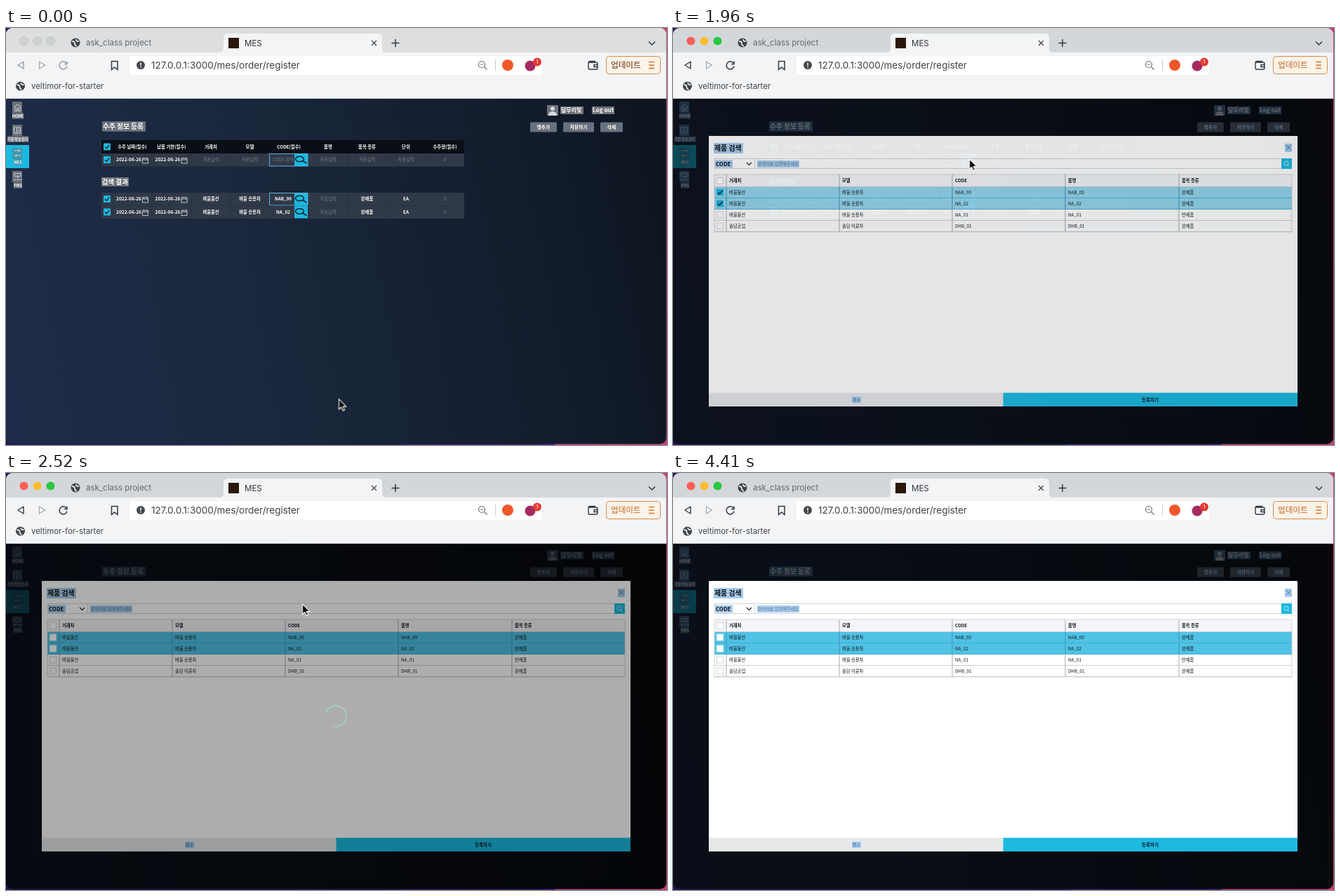
An HTML page for the animation above (5180 ms loop, 942 by 595 pixels).

```html
<!DOCTYPE html>
<html>
<head>
<meta charset="utf-8">
<title>MES</title>
<style>
  html, body { margin: 0; width: 100%; height: 100%; overflow: hidden; background: #22164f; }
  svg { display: block; width: 942px; height: 595px; }
  text { font-family: "Noto Sans CJK KR", "Noto Sans CJK", sans-serif; white-space: pre; }
  text.ui { font-family: Inter, Roboto, sans-serif; }
</style>
</head>
<body>
<svg id="stage" viewBox="0 0 942 595" xmlns="http://www.w3.org/2000/svg"></svg>
<script>
const LOOP = 5180;
const CYAN = '#1cb9e0';

// Drawing helpers: each returns SVG markup; text is placed by its visual centre line.
const rect = (x, y, w, h, fill, more = '') =>
  `<rect x="${x}" y="${y}" width="${w}" height="${h}" fill="${fill}" ${more}/>`;
const circle = (x, y, r, fill, more = '') =>
  `<circle cx="${x}" cy="${y}" r="${r}" fill="${fill}" ${more}/>`;
const line = (d, stroke, width = 1, more = '') =>
  `<path d="${d}" fill="none" stroke="${stroke}" stroke-width="${width}" ${more}/>`;
const text = (x, y, s, size, fill, weight = 400, anchor = 'start', cls = '') =>
  `<text x="${x}" y="${y + size * .365}" font-size="${size}" fill="${fill}" font-weight="${weight}" text-anchor="${anchor}" class="${cls}">${s}</text>`;
const mid = (x, y, s, size, fill, weight = 700) => text(x, y, s, size, fill, weight, 'middle');
const group = (id, body, more = '') => `<g id="${id}" ${more}>${body}</g>`;

// Selected-text box: blue while the window has focus, grey before.
const mark = (x, y, w, h) =>
  rect(x, y, w, h, '#4f79a9') + rect(x, y, w, h, '#6d7279', 'class="idle"');
const lightMark = (x, y, w, h) => rect(x, y, w, h, '#a6cdf0');

const globe = (x, y) => circle(x, y, 6.5, '#3f4347') +
  line(`M${x - 5} ${y - 2}q4 0 4 3t3 4M${x + 1} ${y - 5}q-1 3 4 3`, '#e4e6e8', 1.8);

function chrome() {
  const lights = ['#ff5f57', '#febc2e', '#28c840'].map((c, i) =>
    circle(25.5 + i * 19, 18.5, 6, c) +
    circle(25.5 + i * 19, 18.5, 6, '#cfd0d2', 'class="idle" stroke="#bfc1c3" stroke-width=".6"')).join('');
  const nav = (color, cls = '') =>
    line('M25 48L17 53L25 58Z', color, 1.4, `class="${cls}" stroke-linejoin="round"`) +
    line('M86 50A5.5 5.5 0 1 0 87 54.500M87 47.500V51.500H83', color, 1.5, `class="${cls}"`);
  return rect(0, 0, 942, 36, '#d4d7da') + rect(0, 0, 942, 36, '#dcdee0', 'class="idle"') +
    rect(0, 35, 942, 66, '#f3f4f5') + lights +
    globe(99, 21) + text(114, 21, 'ask_class project', 11.5, '#65696d', 400, 'start', 'ui') +
    `<path d="M304 35q6 0 6-6v-15q0-6 6-6h214q6 0 6 6v15q0 6 6 6z" fill="#f3f4f5"/>` +
    rect(317, 14, 15, 15, '#2b1708') +
    text(340, 21.500, 'MES', 11.5, '#33373b', 400, 'start', 'ui') +
    line('M521 18l7 7m0-7l-7 7', '#44484c', 1.3) + line('M555 16v11m-5.500-5.500h11', '#34383c', 1.5) +
    line('M916 19.500l4.500 4.500l4.500-4.500', '#34383c', 1.5) +
    nav('#34383c') + rect(14, 44, 78, 18, '#f3f4f5', 'class="idle"') + nav('#999da1', 'idle') +
    line('M47.500 48L55.500 53L47.500 58Z', '#a4a8ab', 1.2) +
    line('M150.500 47.500h8.500v12l-4.250-3.500l-4.250 3.500z', '#34383c', 1.5) +
    rect(176, 40, 588, 27, '#fff', 'rx="4"') +
    circle(192, 53, 6, '#44484c') + line('M192 49.500v4.200m0 1.300v1.500', '#fff', 1.5) +
    text(207, 53, '127.0.0.1:3000/mes/order/register', 13.45, '#3d4145', 400, 'start', 'ui') +
    circle(678, 52, 4.500, 'none', 'stroke="#6a6e72" stroke-width="1.2"') +
    line('M681.500 55.500l4 4M676 52h4', '#6a6e72', 1.2) +
    line('M697.500 45v16', '#c9cccf') +
    circle(715, 53, 8, '#f2572b') + circle(747, 54, 7.500, '#a52b62') +
    circle(757, 48.500, 6, '#e5392f') + text(757, 48.500, '1', 8, '#fff', 400, 'middle', 'ui') +
    line('M830.500 49h10.500q2 0 2 2v6q0 2-2 2h-9q-2 0-2-2v-8q0-1 2-1.500h8M843 52.500h-5v3h5', '#34383c', 1.4) +
    rect(855.500, 40.500, 77, 25, '#fcf3e9', 'rx="4" stroke="#dc8a45"') +
    text(862, 53, '업데이트', 11.600, '#c5651f') +
    `<g class="idle">${text(862, 53, '업데이트', 11.600, '#7c5a45')}</g>` +
    line('M916 48.500h8M916 53h8M916 57.500h8', '#d9772a', 1.3) +
    globe(20.500, 83) + text(36, 83, 'veltimor-for-starter', 11.4, '#42464a', 400, 'start', 'ui') +
    line('M0 100.500h942', '#c5c8cc');
}

function sidebar() {
  const icons = [
    'M11.500 113l5-4l5 4M13 112.500v6h2.500v-4h2v4h2.500v-6',
    'M11.500 142h4v8h-4zM15.500 142h5v8h-5M18 145v3',
    'M11.500 175h10m-3-2v4M11.500 182h10m-7-2v4',
    'M12 207.500h9v4h-9zM11 216.500h3m1.500 0h3m1.500 0h3M16.500 211.500v3'
  ];
  const labels = [['HOME', 16], ['기준정보관리', 30], ['MES', 11], ['PMS', 12]];
  return rect(0, 167, 33, 33, CYAN) + icons.map((d, i) => {
    const y = 105 + i * 33, [s, w] = labels[i], top = i === 2;
    return `<g opacity="${top ? .5 : 1}">${mark(9, y, 14, 16) + mark(17 - w / 2, y + 16.500, w, 8)}</g>` +
      line(d, '#c9d6e4', .9) + mid(17, y + 20.500, s, 5.500, '#fff');
  }).join('');
}

const checkbox = (x, y) => rect(x, y, 10, 10, CYAN, 'rx="1"') +
  line(`M${x + 2} ${y + 5}l2.300 2.500l4-5`, '#122438', 1.4);
const calendar = (x, y) => line(`M${x} ${y - 3}h8v7h-8zM${x} ${y - 1}h8M${x + 2} ${y - 4.500}v2m4-2v2`, '#dfe4ea', .8);
const edges = [152, 208, 264, 320, 375, 431, 487, 542, 598, 653];
const centre = i => (edges[i] + edges[i + 1]) / 2;

// Dimmed values are placeholders, marked with a leading dot.
function orderRow(y, cells, focused) {
  const cy = y + 9;
  let out = rect(136, y, 517, 18.500, '#303947') + checkbox(139, cy - 5) +
    edges.slice(0, -1).map(x => line(`M${x} ${y}v18`, '#29323f', .8)).join('');
  [157, 212.500].forEach(x => out += text(x, cy, '2022-06-26', 6.600, '#fff', 700) + calendar(x + 37.500, cy + 1));
  cells.forEach((s, k) => {
    const dim = s[0] === '.', x = k === 2 ? 395 : centre(k + 2);
    out += mid(x, cy, dim ? s.slice(1) : s, 6.300, dim ? '#747d89' : '#fff', dim ? 400 : 700);
  });
  const button = rect(411, y, 19, 18, CYAN) +
    `<ellipse cx="418.500" cy="${cy - 1}" rx="6" ry="3.800" fill="none" stroke="#0d2636" stroke-width="1.600"/>` +
    line(`M422.500 ${cy + 1.500}l6 3.500`, '#0d2636', 1.8);
  out += y === 179 ? group('codeButton', button) : button;
  return out + (focused ? rect(375.500, y + .5, 54.500, 17.500, 'none', 'stroke="#5ab2ea"') : '');
}

function page() {
  const heads = ['수주 날짜(필수)', '납품 기한(필수)', '거래처', '모델', 'CODE(필수)', '품명', '품목 종류', '단위', '수주량(필수)'];
  const auto = '.자동입력', done = [auto, '완제품', 'EA', '.0'];
  const buttons = [[747, 38, '행추가', 21], [794, 44, '저장하기', 27], [847, 32, '삭제', 15]];
  return rect(0, 101, 942, 494, 'url(#night)') + sidebar() +
    mark(771, 110, 16, 15) + circle(779, 115, 3, '#d3dae2') +
    `<path d="M773 125q0-6 6-6t6 6z" fill="#d3dae2"/>` +
    mark(790, 112, 33, 11) + text(791, 117.500, '달무리빛', 8, '#fff', 700) +
    mark(835, 112, 32, 11) + text(836, 117.500, 'Log out', 8.200, '#fff', 700) +
    buttons.map(([x, w, s, m]) => rect(x, 134.500, w, 14, '#667080', 'rx="1.500"') +
      mark(x + w / 2 - m / 2, 137, m, 9) + mid(x + w / 2, 141.500, s, 6.800, '#fff')).join('') +
    mark(137, 133.500, 62, 14) + text(138, 140.500, '수주 정보 등록', 9.700, '#fff', 700) +
    rect(136, 160, 517, 19, '#0a0e15') + checkbox(139, 164.500) +
    heads.map((s, i) => mid(centre(i), 169.500, s, 6.400, '#fff')).join('') +
    orderRow(179, [auto, auto, '.CODE 검색', auto, auto, auto, '.0'], true) +
    mark(136, 213, 39, 13) + text(136.500, 219.500, '검색 결과', 9.600, '#fff', 700) +
    orderRow(235, ['벼울물산', '벼울 승용차', 'NAB_00', ...done], true) +
    orderRow(253.500, ['벼울물산', '벼울 승용차', 'NA_02', ...done]);
}

function modal() {
  const columns = [76, 237, 398, 559, 721];
  const rows = [
    ['거래처', '모델', 'CODE', '품명', '품목 종류'],
    ['벼울물산', '벼울 승용차', 'NAB_00', 'NAB_00', '완제품'],
    ['벼울물산', '벼울 승용차', 'NA_02', 'NA_02', '완제품'],
    ['벼울물산', '벼울 승용차', 'NA_01', 'NA_01', '반제품'],
    ['솔담공업', '솔담 이륜차', 'DHB_01', 'DHB_01', '완제품']
  ];
  const table = rows.map((cells, i) => {
    const y = i ? 211 + i * 16 : 209, h = i ? 16 : 18, cy = y + h / 2 - (i ? .5 : 0);
    const picked = i === 1 || i === 2;
    return rect(59, y, 823, h, picked ? '#4fc2e5' : i ? '#fff' : '#f4f6f9') +
      (picked ? rect(59, y, 823, h, '#94d6ee', 'class="picked"') : '') +
      line(`M59 ${y + h - .5}h823`, picked ? '#43abd0' : '#c8cbcf', .9) +
      rect(62.500, cy - 4.500, 9, 9, '#fff', `stroke="${picked ? '#e4f4fa' : '#cdd0d4'}" stroke-width=".8"`) +
      (picked ? `<g class="picked">${checkbox(62, cy - 5)}</g>` : '') +
      columns.map(x => line(`M${x} ${y}v${h}`, picked ? '#4195b2' : '#a5a9ae')).join('') +
      cells.map((s, k) => text(columns[k] + 4, cy, s, 6.300, '#15181c', i ? 500 : 700)).join('');
  }).join('');
  return rect(51, 154, 839, 386, '#fff', 'rx="1"') +
    lightMark(58, 164, 42, 15) + text(59, 171.500, '제품 검색', 9.900, '#111', 700) +
    lightMark(872, 165, 10, 12) + line('M873.500 167l7 7m0-7l-7 7', '#3d5f80', .9) +
    rect(59.500, 186.500, 822, 14, '#fff', 'stroke="#cfd2d6"') + line('M116.500 187v14', '#cfd2d6') +
    lightMark(60, 188.500, 25, 11) + text(61, 194, 'CODE', 7.900, '#111', 700) +
    line('M105 192l3.500 3.500l3.500-3.500', '#222', 1.2) +
    lightMark(120, 189, 60, 10) + text(120.500, 194, '검색어를 입력해주세요.', 6.200, '#5c7791') +
    rect(867, 186, 15, 15, CYAN) + circle(874, 193, 3, 'none', 'stroke="#bfe6f5"') + line('M876 195l2.500 2.500', '#bfe6f5') +
    table + rect(59, 209, 823, 82, 'none', 'stroke="#c8cbcf" stroke-width=".8"') +
    rect(51, 520.500, 419.500, 19.500, '#e6e8ea') + rect(470.500, 520.500, 419.500, 19.500, CYAN) +
    lightMark(255, 526, 13, 9) + mid(261.500, 530.500, '취소', 6.300, '#3c5c7c', 500) +
    mid(680, 530.500, '등록하기', 6.500, '#0c1c28');
}

const veil = id => rect(0, 101, 942, 494, '#000', `id="${id}"`);
const arrow = '<path d="M0 0V14.500L3.300 11.500L5.600 16.600L8 15.600L5.800 10.600H10.300Z" fill="#000" stroke="#fff" stroke-width="1.100"/>';
const beamPath = 'M-3-7q3 0 3 2q0-2 3-2M0-5V6M-3 8q3 0 3-2q0 2 3 2M-2 1h4';

document.getElementById('stage').innerHTML = `
  <defs>
    <linearGradient id="night" gradientUnits="userSpaceOnUse" x1="0" y1="480" x2="942" y2="300">
      <stop offset="0" stop-color="#1e2c49"/><stop offset=".45" stop-color="#19263a"/>
      <stop offset=".8" stop-color="#121d2d"/><stop offset="1" stop-color="#0e1520"/>
    </linearGradient>
    <linearGradient id="desk">
      <stop offset=".6" stop-color="#24175a"/><stop offset=".6" stop-color="#4c1d98"/>
      <stop offset=".83" stop-color="#4c1d98"/><stop offset=".83" stop-color="#c2407a"/>
    </linearGradient>
    <clipPath id="frame"><rect width="941" height="593.500" rx="9"/></clipPath>
  </defs>
  ${rect(0, 0, 942, 595, 'url(#desk)')}
  <g clip-path="url(#frame)">
    ${chrome()}${page()}${veil('backdrop')}${group('modal', modal())}${veil('loaderVeil')}
    ${group('loader', `<g transform="translate(470 347) rotate(6)">${group('spin',
      circle(0, 0, 15, 'none', 'id="arc" pathLength="360" stroke="#9aebc8" stroke-width="1.900"'))}</g>`)}
  </g>
  ${group('cursor', group('arrow', arrow) + group('beam', line(beamPath, '#fff', 2.400) + line(beamPath, '#000', 1.2)))}`;

// Rows are [time in ms, value, easing towards the next row]; equal times make a hard cut.
function play(selector, prop, rows) {
  const last = rows[rows.length - 1];
  const frames = [[0, rows[0][1]], ...rows, [LOOP, last[1]]].map(([time, value, easing = 'linear']) =>
    ({ offset: time / LOOP, [prop]: value, easing }));
  document.querySelectorAll(selector).forEach(el =>
    el.animate(frames, { duration: LOOP, iterations: Infinity }));
}
const cut = (selector, first, ...times) => {
  let value = first;
  play(selector, 'opacity', times.flatMap(t => [[t, value], [t, value = 1 - value]]));
};
const at = (x, y) => `translate(${x}px, ${y}px)`;
const FADE = 'cubic-bezier(.4,0,.2,1)';

cut('.idle', 1, 840);
cut('.picked', 1, 2240);
cut('#arrow', 1, 2590, 3150, 4340);
cut('#beam', 0, 2590, 3150);
play('#codeButton', 'opacity', [[1540, 1], [1540, .5], [1680, .5], [1680, 1]]);
play('#modal', 'opacity', [[1820, 0, FADE], [2045, 1]]);
play('#backdrop', 'opacity', [[1820, 0, FADE], [2045, .67]]);
play('#loaderVeil', 'opacity', [[2000, 0, FADE], [2225, .69], [2450, .69, FADE], [2645, 0]]);
play('#loader', 'opacity', [[2000, 0], [2090, 1], [2450, 1, FADE], [2645, 0]]);
play('#spin', 'transform', [[1946, 'rotate(0deg)'], [2646, 'rotate(180deg)']]);
play('#arc', 'strokeDasharray', [[1946, '12 360', 'ease-in-out'], [2646, '286 360']]);
play('#arc', 'strokeDashoffset', [[1946, '0', 'ease-in-out'], [2646, '-43']]);
play('#cursor', 'transform', [
  [70, at(474.500, 529.500)], [140, at(468, 462)], [280, at(468, 462), 'ease-in-out'], [770, at(422.500, 187)],
  [3080, at(422.500, 187), 'ease-in'], [3570, at(428, 343)], [3640, at(440.500, 491)],
  [3780, at(440.500, 491), 'ease-in-out'], [4270, at(453, 349)]
]);
</script>
</body>
</html>
```
